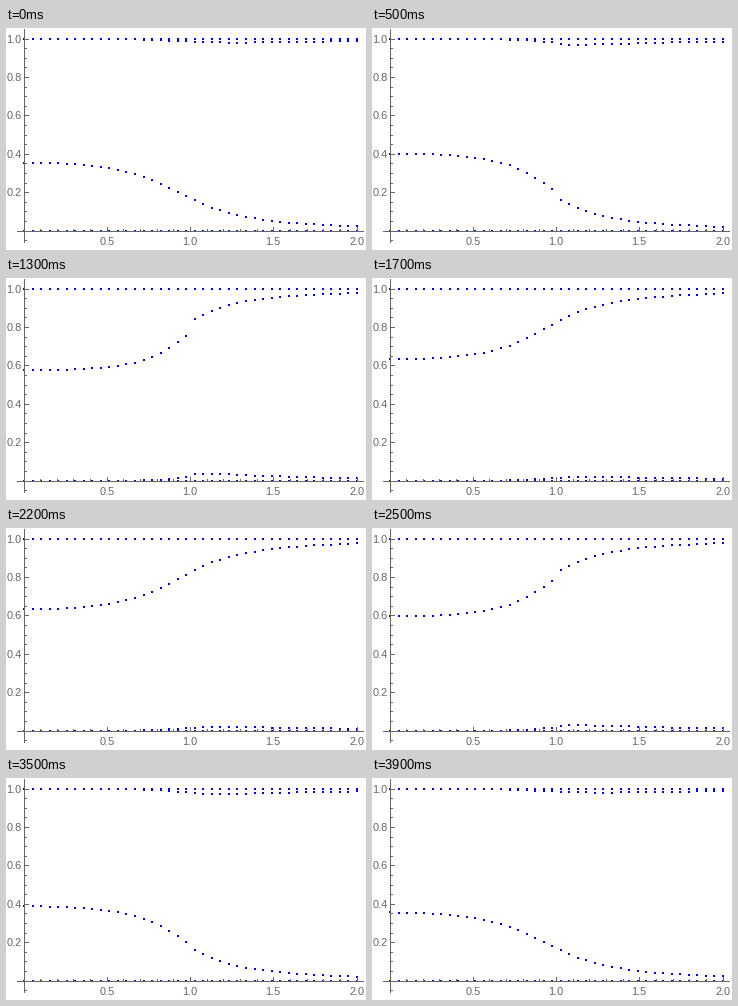
A matplotlib script that plays this animation: 360 px wide and 222 px high, repeating every 4.1 s.

```python
import numpy as np
import matplotlib.pyplot as plt
from matplotlib.animation import FuncAnimation
from matplotlib.collections import PolyCollection

W, H, DPI = 360, 222, 100
FRAMES, INTERVAL = 41, 100
GRAY = "#666666"
X0, X_UNIT = 18, 166.5
Y0, Y_UNIT = 203, 192.0
CELLS = 8
MASS, EDGE = 0.3, 0.5
RATIOS = np.linspace(0, 2, 40)


def chain(ratio, theta):
    """Staggered dimer chain; below ratio 1 an extra site gaps each end."""
    mass = MASS * np.cos(theta)
    hops = np.ones(2 * CELLS + 1)
    hops[1::2] = ratio
    hops[[0, -1]] = EDGE * np.sin(theta) if ratio < 1 else 0
    levels = np.tile([mass, -mass], CELLS + 1)
    return np.diag(levels) - np.diag(hops, 1) - np.diag(hops, -1)


def occupations(theta):
    """Correlation eigenvalues of the left half at half filling."""
    half = CELLS + 1
    hams = np.array([chain(x, theta) for x in RATIOS])
    states = np.linalg.eigh(hams)[1][:, :half, :half]
    return np.linalg.eigvalsh(states @ states.transpose(0, 2, 1))


def dots(frame):
    theta = np.radians(9 * frame + 4)
    corners = set()
    for x, row in zip(RATIOS, occupations(theta)):
        left = int(X0 - 0.5 + X_UNIT * x)
        tops = np.floor(Y0 - 0.5 - Y_UNIT * row)
        corners.update((left, int(top)) for top in tops)
    return [[(x, y), (x + 2, y), (x + 2, y + 2), (x, y + 2)]
            for x, y in sorted(corners)]


fig = plt.figure(figsize=(W / DPI, H / DPI), dpi=DPI, facecolor="white")
ax = fig.add_axes([0, 0, 1, 1])
ax.set_xlim(0, W)
ax.set_ylim(H, 0)
ax.axis("off")


def line(xs, ys):
    ax.plot(xs, ys, color=GRAY, lw=72 / DPI, antialiased=False,
            solid_capstyle="butt", zorder=6)


def label(x, y, value, align):
    ax.text(x, y, f"{value:.1f}", color=GRAY, family="Liberation Sans",
            size=11 * 72 / DPI, ha=align, va="center_baseline")


line([11, 357], [Y0, Y0])
line([X0, X0], [1, 214])
for i in range(1, 21):
    x = np.floor(X0 + X_UNIT * i / 10)
    line([x, x], [Y0, Y0 - (4 if i % 5 == 0 else 2)])
    if i % 5 == 0:
        label(x, 212.5, i / 10, "center")
for i in range(-1, 21):
    y = np.floor(Y0 - Y_UNIT * i / 20)
    line([X0, X0 + (4 if i % 4 == 0 else 2)], [y, y])
    if i > 0 and i % 4 == 0:
        label(15.5, y, i / 20, "right")

points = PolyCollection([], facecolors="blue", edgecolors="none",
                        antialiaseds=False, zorder=5)
ax.add_collection(points, autolim=False)


def update(frame):
    points.set_verts(dots(frame))
    return (points,)


anim = FuncAnimation(fig, update, frames=FRAMES, interval=INTERVAL,
                     repeat=True, repeat_delay=0, blit=False)
plt.show()
```
